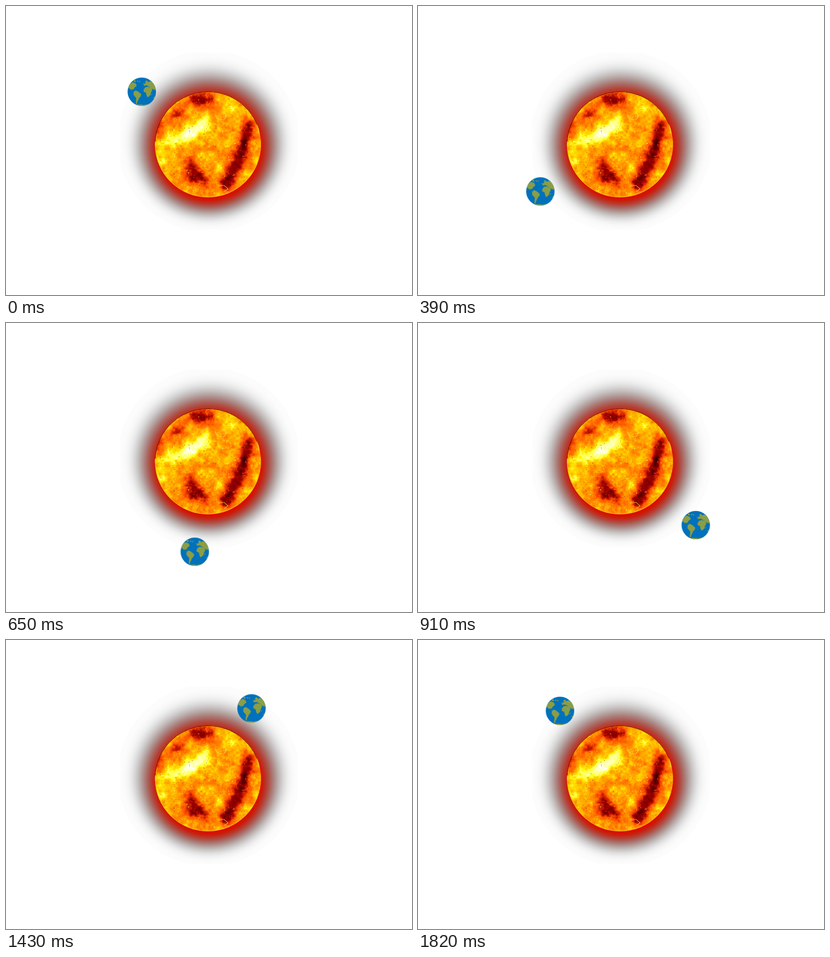
An HTML page with a canvas for the animation above (1.95 s loop, 885 px wide and 632 px high).

```html
<!DOCTYPE html>
<html lang="en">
<head>
<meta charset="utf-8">
<title>Earth and Sun</title>
<style>
  html, body { margin: 0; width: 100%; height: 100%; overflow: hidden; background: #fff; }
  canvas, svg { position: absolute; left: 0; top: 0; display: block; }
</style>
</head>
<body>
<canvas id="sky" width="885" height="632"></canvas>
<svg id="earth" width="62" height="62" viewBox="-31 -31 62 62">
  <clipPath id="disc"><circle r="31"/></clipPath>
  <circle r="31" fill="#0071bc"/>
  <g clip-path="url(#disc)" fill="#8a9e45">
    <path d="M-31-7-26-17-20-21-13-18-11-13-16-9-18-5-23-5-22-2-16 0-20-1-28-8Z"/>
    <path d="M-18-26-14-25-13-21-17-22ZM-11-25-7-23-9-21ZM-6-24-3-23-5-20Z"/>
    <path d="M-18 1-14-3-9-1-5 2-1 6-3 11-6 14-8 19-10 22-11 28-13 25-12 14-18 7Z"/>
    <path d="M4-5 8-10 13-11 21-9 23-4 20 2 19 7 15 11 12 12 10 7 9 2 4 0Z"/>
    <path d="M4-13 5-17 9-20 7-22 11-25 14-21 18-23 23-21 31-12 31-4 25-5 18-10 11-14Z"/>
    <path d="M2-17 4-19 5-16ZM21 5 23 3 21 9ZM24 14 31 8 31 16 27 14Z"/>
    <path d="M-14 29Q-4 27 4 29L15 27 12 33-10 33Z"/>
  </g>
</svg>
<script>
const ctx = document.getElementById('sky').getContext('2d');
const SUN = { x: 440.3, y: 302.8, r: 115.7 };
const clamp = v => Math.max(0, Math.min(1, v));
const ease = t => t * t * (3 - 2 * t);
const mix = (a, b, t) => a + (b - a) * t;

// Red near the sun, through brown to a pale grey edge
function drawGlow() {
  const g = ctx.createRadialGradient(443, 312, 100, 442, 296, 199);
  for (let t = 0; t < 1; t += .04) {
    const fade = .012 + .98 * (.5 + .5 * Math.cos(Math.PI * t)) ** 1.6;
    const grey = .1 + .9 * ease(clamp(t / .7));
    const [r, b] = [fade * grey, fade * (1.1 - .1 * grey)];
    g.addColorStop(t, `rgb(${[r, fade, b].map(d => 255 * clamp(1 - d))})`);
  }
  g.addColorStop(.99, '#fcfcfc');
  g.addColorStop(1, '#fff');
  ctx.fillStyle = g;
  ctx.fillRect(249, 102, 387, 387);
}

// Seeded value noise in -0.5..0.5
function hash(x, y) {
  let n = Math.imul(x, 374761393) + Math.imul(y, 668265263);
  n = Math.imul(n ^ (n >>> 13), 1274126177);
  return ((n ^ (n >>> 16)) >>> 0) / 4294967296;
}
function noise(x, y) {
  const i = Math.floor(x), j = Math.floor(y);
  const u = ease(x - i), v = ease(y - j);
  const row = k => mix(hash(i, k), hash(i + 1, k), u);
  return mix(row(j), row(j + 1), v) - .5;
}

function brush(c, path, color, width, blur = 0) {
  c.filter = blur ? `blur(${blur}px)` : 'none';
  c.strokeStyle = color;
  c.lineWidth = width;
  c.lineCap = c.lineJoin = 'round';
  c.stroke(new Path2D(path));
}

// Paint a soft brightness map, add noise, then map it to fire colours
function sunTexture(left, top, size) {
  const tex = document.createElement('canvas');
  tex.width = tex.height = size;
  const c = tex.getContext('2d');
  c.fillStyle = '#9b9b9b';
  c.fillRect(0, 0, size, size);
  c.translate(-left, -top);
  brush(c, 'M345 305V355M455 372l8-20M470 208l20 12', 'rgba(255,255,255,.35)', 26, 9);
  brush(c, 'M364 289L388 287 434 256', 'rgba(255,255,255,.9)', 27, 8);
  brush(c, 'M412 206h26M526 262Q522 325 478 384M400 366l30 14', 'rgba(0,0,0,.74)', 27, 8);
  brush(c, 'M368 238l18-9M333 262v22M398 338l14 18M475 398l20-6', 'rgba(0,0,0,.5)', 15, 6);

  const img = c.getImageData(0, 0, size, size), d = img.data;
  for (let p = 0; p < d.length; p += 4) {
    const x = p / 4 % size, y = Math.floor(p / 4 / size);
    let v = d[p] / 255;
    v += .2 * noise(x / 14, y / 14) + .14 * noise(x / 6, y / 6) + .08 * noise(x / 2.5, y / 2.5);
    v += .07 * clamp(1 - 14 * Math.abs(noise(x / 16 + 7, y / 16) + .4 * noise(x / 5, y / 5 + 60)));
    d[p] = 255 * clamp(.12 + v * 2.1);
    d[p + 1] = 255 * clamp((v - .24) * 1.72);
    d[p + 2] = 255 * clamp((v - .76) * 3.4);
  }
  c.putImageData(img, 0, 0);
  return tex;
}

function drawSpecks(count) {
  for (let i = 0; i < count; i++) {
    const a = hash(i, 11) * 2 * Math.PI, r = Math.sqrt(hash(i, 12)) * 112;
    ctx.fillStyle = i % 3 ? 'rgba(170,50,0,.5)' : 'rgba(255,238,110,.7)';
    ctx.beginPath();
    ctx.arc(SUN.x + r * Math.cos(a), SUN.y + r * Math.sin(a), .5 + hash(i, 13) * .8, 0, 7);
    ctx.fill();
  }
}

function rim(r, from, to, color) {
  ctx.beginPath();
  ctx.arc(SUN.x, SUN.y, r, from, to);
  ctx.strokeStyle = color;
  ctx.lineWidth = 1;
  ctx.stroke();
}

function drawSun() {
  ctx.save();
  ctx.beginPath();
  ctx.arc(SUN.x, SUN.y, SUN.r, 0, 7);
  ctx.clip();
  ctx.drawImage(sunTexture(324, 186, 234), 324, 186);
  drawSpecks(240);
  const filaments = 'M425 238l16-9M456 238l4 7 8 4 7-1 5-6-3-8M463 394l12-2 9 8-9 6M538 234q13 26 14 52';
  brush(ctx, filaments, 'rgba(255,225,80,.75)', 1.2);
  ctx.restore();
  rim(SUN.r - .4, 3.2, 5.9, '#4a0c00');
  rim(SUN.r - .9, .35, 2.9, '#ffc02c');
}

drawGlow();
drawSun();

// Orbit: key points [step, x, y] joined by a closed smooth curve
const STEPS = 15;
const KEYS = [
  [0, 296, 187.5], [2, 233, 328], [3, 266.7, 405.5], [5, 411.5, 500.2], [7, 605.5, 442],
  [9, 636.5, 265], [10, 589, 184.7], [12, 473.5, 132.7], [14, 309.5, 155]
];
function key(i) {
  const n = KEYS.length, [s, x, y] = KEYS[(i + n) % n];
  return [s + STEPS * Math.floor(i / n), x, y];
}
function orbit(step) {
  const i = KEYS.findLastIndex(k => k[0] <= step);
  const [a, b, c, d] = [-1, 0, 1, 2].map(o => key(i + o));
  const span = c[0] - b[0], t = (step - b[0]) / span;
  return [1, 2].map(n => {
    const from = (c[n] - a[n]) / (c[0] - a[0]) * span;
    const to = (d[n] - b[n]) / (d[0] - b[0]) * span;
    return mix(b[n], c[n], ease(t)) + t * (1 - t) * (from * (1 - t) - to * t);
  });
}

const frames = Array.from({ length: STEPS + 1 }, (_, i) => {
  const [x, y] = orbit(i % STEPS);
  return { transform: `translate(${x - 31}px, ${y - 31}px)`, offset: i / STEPS, easing: 'step-end' };
});
document.getElementById('earth').animate(frames, { duration: 130 * STEPS, iterations: Infinity });
</script>
</body>
</html>
```
